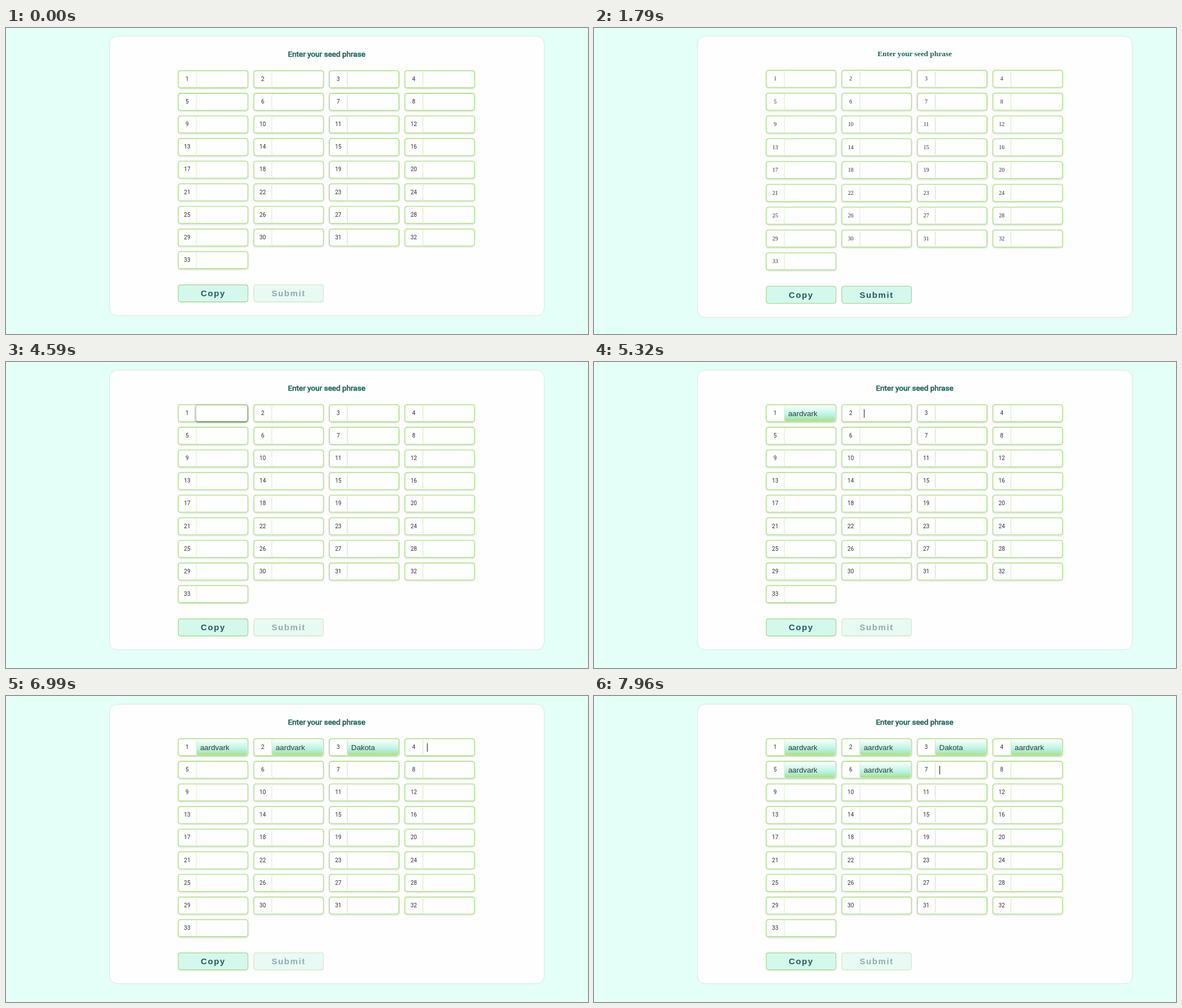
Recreate the animation shown at these times as an HTML page. Size 1031 by 543 pixels, loop 8000 ms.

```html
<!DOCTYPE html>
<html lang="en">
<head>
<meta charset="utf-8">
<title>Seed phrase</title>
<style>
html, body { margin: 0; width: 100%; height: 100%; overflow: hidden; background: #e4fff7; }
#stage { position: relative; width: 1031px; height: 543px; overflow: hidden;
  font-family: Roboto, sans-serif; color: #2d2d33; }
#stage * { box-sizing: border-box; }
#card, .cell, .num, .field, .btn, #title, #popup { position: absolute; }
.cell, .btn, #popup { left: 0; top: 0; }
#card { left: 183px; top: 14px; width: 770.5px; height: 497px; background: #fefefe;
  border: 1px solid #d9e5df; border-radius: 14px; }
#title { left: 183px; top: 36px; width: 770px; line-height: 20px; text-align: center;
  font-size: 13.53px; color: #1c6259; -webkit-text-stroke: .65px #1c6259; }
.cell { width: 125px; height: 32px; background: #fefefe; border-radius: 5px;
  box-shadow: inset 0 0 0 1.6px #aee088, 0 1px 3px rgba(0, 0, 0, .16); }
.num { left: 0; top: 0; width: 33px; line-height: 32px; text-align: center; font-size: 10px; }
.field { left: 32px; top: 2px; width: 91px; height: 28px; padding-left: 6.5px;
  display: flex; align-items: center; border-left: 1px solid #c4e7ac; border-radius: 4px;
  font: 13.333px/15px "Liberation Sans", Arial, sans-serif; color: #333a33; }
.field.full { background: linear-gradient(#fdfffe, #b9f4e4 60%, #a9de8e); }
.caret { width: 1px; height: 15px; background: #111; }
.btn { width: 125px; height: 32px; line-height: 31px; text-align: center;
  background: #d5f8ec; box-shadow: inset 0 0 0 1.6px #aedb9a; border-radius: 5px;
  font-family: "Liberation Sans", Arial, sans-serif; font-weight: bold; font-size: 15px;
  letter-spacing: 1.6px; color: #1c5f59; }
#popup { width: 92px; height: 333px; padding: 1px 0; overflow: hidden; background: #fff;
  border: 1px solid #b4b4b4; font: 12px/16.45px "Open Sans", "Noto Sans", sans-serif; color: #222; }
#popup div { padding-left: 6px; white-space: nowrap; }
.serif #title { font: bold 13.333px/20px "Liberation Serif", serif; -webkit-text-stroke: 0; }
.serif .num { font-family: "Liberation Serif", serif; }
.serif #card { height: 500px; }
</style>
</head>
<body>
<div id="stage">
  <div id="card"></div>
  <div id="title">Enter your seed phrase</div>
  <div id="copy" class="btn">Copy</div>
  <div id="submit" class="btn">Submit</div>
</div>
<script>
const LOOP = 8000;
const LEFT = 304.4, COLUMN = 133.8;
const WORDS = {
  a: "aardvark absurd accrue acme adrift adroitness adult adviser afflict aftermath " +
     "aggregate ahead aimless alkali allow almighty alone ammo amulet amusement",
  d: "Dakota dashboard deadbolt decadence December decimal designing detector detergent " +
     "determine dictator dinosaur direction disable disbelief disruptive distortion document dogsled dragnet"
};

// time, focused cell, typed text, caret shown, glow, list open
const STEPS = [
  [0, 0, "", 0, 0, 0],
  [1860, 1, "", 1, .3, 0],
  [1920, 1, "", 1, .7, 0],
  [1980, 1, "", 1, 1, 0],
  [2340, 1, "", 0, 1, 0],
  [2870, 1, "", 1, 1, 0],
  [3000, 1, "ф", 1, 1, 0],
  [3530, 1, "ф", 0, 1, 0],
  [3790, 1, "", 0, 1, 0],
  [4060, 1, "", 1, 1, 0],
  [4590, 1, "", 0, 1, 0],
  [4790, 1, "a", 1, 1, 1],
  [5320, 2, "", 1, 0, 0],
  [5380, 2, "", 1, .5, 0],
  [5450, 2, "", 1, 1, 0],
  [5860, 2, "a", 1, 1, 1],
  [6000, 3, "", 1, 0, 0],
  [6060, 3, "", 1, .4, 0],
  [6130, 3, "", 1, .8, 0],
  [6190, 3, "", 1, 1, 0],
  [6530, 3, "", 0, 1, 0],
  [6790, 3, "d", 1, 1, 1],
  [6930, 4, "", 1, 0, 0],
  [7000, 4, "", 1, .5, 0],
  [7060, 4, "", 1, 1, 0],
  [7350, 4, "a", 1, 1, 1],
  [7550, 5, "", 1, 0, 0],
  [7620, 5, "", 1, .5, 0],
  [7680, 5, "a", 1, 1, 1],
  [7760, 6, "", 1, 0, 0],
  [7830, 6, "", 1, .5, 0],
  [7890, 6, "a", 1, 1, 1],
  [7960, 7, "", 1, 0, 0]
];

const stage = document.getElementById("stage");
const copy = document.getElementById("copy");
const submit = document.getElementById("submit");

function add(parent, cls, text = "") {
  const el = document.createElement("div");
  el.className = cls;
  el.textContent = text;
  parent.append(el);
  return el;
}

// A transform keeps fractions of a pixel that left and top would round away.
function place(el, x, y) {
  el.style.transform = `translate(${x}px, ${y}px)`;
}

const cells = Array.from({ length: 33 }, (_, i) => {
  const box = add(stage, "cell");
  add(box, "num", i + 1);
  const field = add(box, "field");
  const text = add(field, "text");
  const caret = add(field, "caret");
  return { box, field, text, caret };
});
const popup = add(stage, "");
popup.id = "popup";

function layout(serif) {
  stage.classList.toggle("serif", serif);
  const [top, pitch, foot] = serif ? [74.3, 40.48, 457.5] : [74.9, 40.13, 454.9];
  cells.forEach((c, i) => {
    c.x = LEFT + (i % 4) * COLUMN;
    c.y = top + Math.floor(i / 4) * pitch;
    place(c.box, c.x, c.y);
  });
  place(copy, LEFT, foot);
  place(submit, LEFT + COLUMN, foot);
}

function submitOpacity(t) {
  if (t < 1790 || t >= 1980) return .5;
  return t < 1860 ? 1 : t < 1920 ? .85 : .65;
}

function openList(cell, letter) {
  place(popup, Math.round(cell.x + 32), Math.round(cell.y + 32));
  popup.replaceChildren();
  WORDS[letter].split(" ").forEach(word => add(popup, "", word));
}

function render(t) {
  const [, focus, typed, caretOn, glow, open] = STEPS.findLast(s => s[0] <= t);
  layout(t >= 1790 && t < 1860);
  submit.style.opacity = submitOpacity(t);
  cells.forEach((c, i) => {
    const n = i + 1, active = n === focus, full = n < focus;
    c.text.textContent = full ? (n === 3 ? "Dakota" : "aardvark") : active ? typed : "";
    c.field.classList.toggle("full", full);
    c.field.style.boxShadow = active && glow ? `0 1px 3px 1px rgba(55, 75, 45, ${.6 * glow})` : "none";
    c.caret.style.opacity = active ? caretOn : 0;
  });
  popup.style.display = open ? "block" : "none";
  if (open) openList(cells[focus - 1], typed);
}

const start = performance.now();
let shown = -1;
function tick() {
  const t = (performance.now() - start) % LOOP;
  const slot = Math.floor(t / 10);
  if (slot !== shown) render(slot * 10);
  shown = slot;
  requestAnimationFrame(tick);
}
tick();
</script>
</body>
</html>
```
